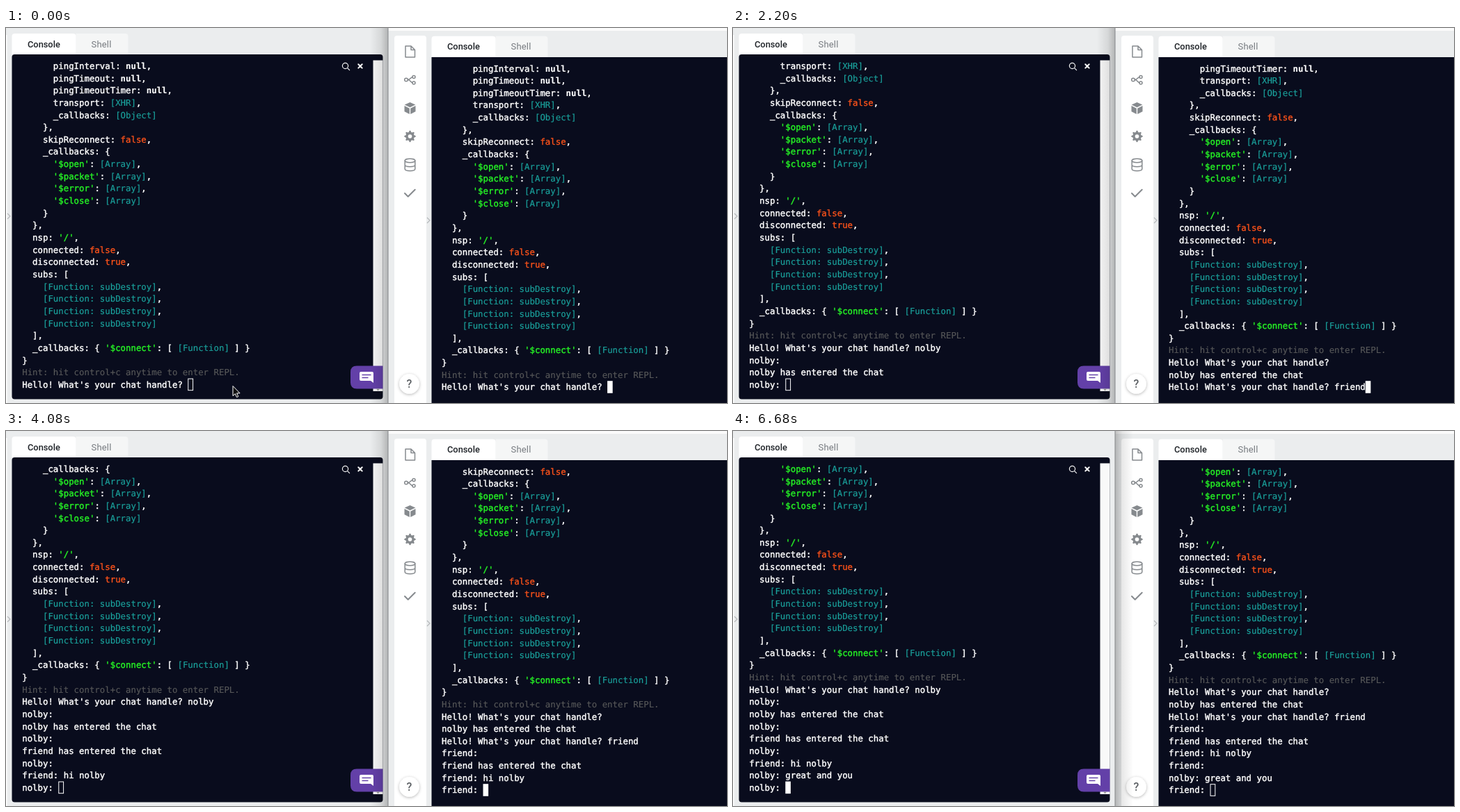
Write an HTML page that moves like this. It is 1036 by 540 pixels and loops after 6720 ms.

```html
<!DOCTYPE html>
<html lang="en">
<head>
<meta charset="utf-8">
<title>Two chat consoles</title>
<style>
html, body { margin: 0; width: 100%; height: 100%; overflow: hidden; background: #ebedee; }
svg { display: block; width: 100vw; height: 100vh; }
.term text { font: 12.36px "DejaVu Sans Mono", monospace; white-space: pre; color: #fff; fill: currentColor; stroke: currentColor; stroke-width: .42; text-rendering: geometricPrecision; }
.term tspan { fill: currentColor; stroke: currentColor; }
.term .cyan { color: #1a9f9a; stroke-width: .2; }
.term .green { color: #25f025; }
.term .red { color: #fb521a; stroke-width: .35; }
.term .bold { font-weight: bold; stroke-width: .1; }
.term .hint { color: #575859; stroke-width: .15; }
.tab { font: 500 12.8px Roboto, sans-serif; fill: #1d2126; }
.off { font-weight: 400; font-size: 13px; letter-spacing: .2px; fill: #777b80; }
.icon { fill: none; stroke: #868a8e; stroke-width: 1.5; stroke-linejoin: round; stroke-linecap: round; }
</style>
</head>
<body>
<svg viewBox="0 0 1036 540" preserveAspectRatio="none">
  <defs>
    <linearGradient id="toLeft" x1="1" x2="0">
      <stop stop-color="#000" stop-opacity=".24"/><stop offset=".4" stop-color="#000" stop-opacity=".09"/><stop offset="1" stop-color="#000" stop-opacity="0"/>
    </linearGradient>
    <linearGradient id="toRight">
      <stop stop-color="#000" stop-opacity=".24"/><stop offset=".4" stop-color="#000" stop-opacity=".09"/><stop offset="1" stop-color="#000" stop-opacity="0"/>
    </linearGradient>
    <filter id="soft" x="-50%" y="-50%" width="200%" height="200%"><feDropShadow dx="0" dy="1" stdDeviation="2" flood-opacity=".3"/></filter>
    <g id="tabs">
      <path d="M92 30V0h71q4 0 4 4v26z" fill="#f5f6f6"/>
      <path d="M0 30V4q0-4 4-4h84q4 0 4 4v26z" fill="#fff"/>
      <text class="tab" x="22.5" y="19.5">Console</text>
      <text class="tab off" x="114" y="19.5">Shell</text>
    </g>
    <path id="chevron" d="M-2-4 2 0-2 4" fill="none" stroke="#b4b7ba" stroke-width="1.1"/>
  </defs>

  <rect width="549" height="540" fill="#ebedee"/>
  <rect y="10" width="1.5" height="530" fill="#fff"/>
  <use href="#tabs" x="8.5" y="8"/>
  <use href="#chevron" x="4" y="271"/>
  <rect x="8.5" y="38" width="533" height="496.500" rx="4" fill="#090c1d"/>
  <rect x="527.5" y="46.500" width="14" height="476.500" fill="#f9f9f9"/>
  <g class="term" id="left"></g>
  <g fill="none" stroke="#f4f4f4" stroke-width="1.2" stroke-linecap="round">
    <circle cx="487.5" cy="54.5" r="4.1"/><path d="m490.6 57.6 3 3"/>
    <path d="m506.3 52.2 5.4 5.4m0-5.4-5.4 5.4" stroke-width="2"/>
  </g>
  <path d="M541.5 486.500H504q-9 0-9 9v15q0 9 9 9h37.500z" fill="#6340a8"/>
  <path d="M510 495h16q2 0 2 2v14l-4-3h-14q-2 0-2-2v-9q0-2 2-2z" fill="#fff"/>
  <path d="M511.500 499.500h13m-13 4h9" stroke="#6340a8" stroke-width="1.6"/>
  <path d="M532 519.500h5l-2.500 3z" fill="#999"/>
  <rect id="shadeLeft" x="523" width="26" height="540" fill="url(#toLeft)"/>

  <rect x="549" width="487" height="540" fill="#ebedee"/>
  <rect x="549" width="487" height="4" fill="#fbfbfb"/>
  <path d="M558 540V15q0-4 4-4h38q4 0 4 4v525z" fill="#fff"/>
  <use href="#tabs" x="611.500" y="11.800"/>
  <use href="#chevron" x="607" y="277"/>
  <path d="M611.500 540V42H1036V540z" fill="#090c1d"/>
  <g class="term" id="right"></g>

  <g class="icon">
    <path d="M574 26h8l5.500 5.500V42H574zM582 26v5.500h5.500"/>
    <path d="M577 74.500c5 0 4-4 8-4m-8 4c5 0 4 4.500 8 4.500"/>
    <g fill="#fff"><circle cx="575" cy="74.500" r="2.300"/><circle cx="586" cy="70.500" r="2"/><circle cx="586" cy="79" r="2"/></g>
    <g stroke="none" fill="#868a8e">
      <path d="m580.500 107 7.800 3.500-7.800 3.800-7.800-3.800zM572.500 112l7.300 3.700v8.300l-7.300-3.700zM588.500 112l-7.300 3.700v8.300l7.300-3.700z"/>
      <path id="gear" fill-rule="evenodd"/>
    </g>
    <ellipse cx="580.500" cy="191" rx="7.300" ry="2.700"/>
    <path d="M573.200 191v12c0 3.600 14.600 3.600 14.600 0v-12M573.200 197c0 3.600 14.600 3.600 14.600 0"/>
    <path d="m573 238 4.700 4.700 10-10" stroke-width="2"/>
  </g>
  <circle cx="579.500" cy="512.500" r="14.300" fill="#fff" filter="url(#soft)"/>
  <text x="579.500" y="518" text-anchor="middle" style="font:500 16px Roboto,sans-serif" fill="#5c6064">?</text>
  <rect id="shadeRight" x="549" width="26" height="540" fill="url(#toRight)"/>
  <path d="M549 0v540" stroke="#85878a" stroke-width="1"/>
  <path id="pointer" d="M326 515.500v14.200l3.300-3 2.200 5 2.300-1-2.200-4.800h4.500z" fill="#111" stroke="#fff" stroke-width="1"/>
</svg>
<script>
const LOOP = 6720, ROWS = 27, CHAR = 7.44, LINE = 17.65;
const $ = id => document.getElementById(id);

const DUMP = `      pingInterval: null,
      pingTimeout: null,
      pingTimeoutTimer: null,
      transport: [XHR],
      _callbacks: [Object]
    },
    skipReconnect: false,
    _callbacks: {
      '$open': [Array],
      '$packet': [Array],
      '$error': [Array],
      '$close': [Array]
    }
  },
  nsp: '/',
  connected: false,
  disconnected: true,
  subs: [
    [Function: subDestroy],
    [Function: subDestroy],
    [Function: subDestroy],
    [Function: subDestroy]
  ],
  _callbacks: { '$connect': [ [Function] ] }
}
Hint: hit control+c anytime to enter REPL.`.split("\n");

const ASK = "Hello! What's your chat handle? ";
const A = "nolby", B = "friend";
const joined = name => `${name} has entered the chat`;
const HI = `hi ${A}`, REPLY = "great and you";

// Each step edits the list of lines for time t.
const print = (at, ...rows) => (lines, t) => { if (t >= at) lines.push(...rows); };
const type = (from, to, text) => (lines, t) => {
  if (t < from) return;
  const n = 1 + Math.floor((t - from) / (to - from) * (text.length - 1));
  lines[lines.length - 1] += text.slice(0, n);
};
const erase = at => (lines, t) => {
  if (t >= at) lines.push(lines.pop().slice(0, -1));
};

const scripts = {
  left: [
    print(0, ASK), type(280, 680, A),
    print(760, A + ": "), print(880, joined(A), A + ": "),
    print(2480, joined(B), A + ": "),
    print(3840, `${B}: ${HI}`, A + ": "),
    type(4320, 4640, "gret"), erase(4880), type(5040, 6000, REPLY.slice(3)),
    print(6360, A + ": ")
  ],
  right: [
    print(0, ASK), print(880, joined(A), ASK), type(1600, 2120, B),
    print(2360, B + ": "), print(2480, joined(B), B + ": "),
    type(2800, 3520, HI), print(3760, B + ": "),
    print(6480, `${A}: ${REPLY}`, B + ": ")
  ]
};

const leftActive = t => (t >= 200 && t < 1400) || t >= 4160;

const paint = s => s.startsWith("Hint") ? `<tspan class="hint">${s}</tspan>` :
  s.replace(/'[^' ]+'|\[[A-Z][^\]]*\]|true|false|null/g, w => {
    const kind = w[0] === "'" ? "green" : w[0] === "[" ? "cyan" : w === "null" ? "bold" : "red";
    return `<tspan class="${kind}">${w}</tspan>`;
  });

const shown = {};
function drawPane(id, x, y, active, t) {
  const lines = [...DUMP];
  scripts[id].forEach(step => step(lines, t));
  const rows = lines.slice(-ROWS);
  const cx = x + rows[ROWS - 1].length * CHAR, cy = y + (ROWS - 1) * LINE;
  const cursor = active
    ? `<rect x="${cx}" y="${cy}" width="7.6" height="17.6" fill="#fff"/>`
    : `<rect x="${cx + 0.5}" y="${cy + 0.5}" width="6.8" height="16.6" fill="none" stroke="#fff"/>`;
  const html = rows.map((s, i) =>
    `<text x="${x}" y="${(y + i * LINE + 13.2).toFixed(2)}">${paint(s)}</text>`).join("") + cursor;
  if (shown[id] !== html) $(id).innerHTML = shown[id] = html;
}

function draw(t) {
  const left = leftActive(t);
  drawPane("left", 23.2, 45.7, left, t);
  drawPane("right", 626, 49.3, !left, t);
  $("shadeLeft").style.opacity = left ? 0 : 1;
  $("shadeRight").style.opacity = left ? 1 : 0;
  $("pointer").style.opacity = t < 280 ? 1 : 0;
}

function gearPath(cx, cy) {
  const pts = Array.from({ length: 32 }, (_, i) => {
    const r = i % 4 < 2 ? 8.2 : 6.2, a = (i - 0.5) * Math.PI / 16;
    return `${(cx + r * Math.cos(a)).toFixed(2)} ${(cy + r * Math.sin(a)).toFixed(2)}`;
  });
  return `M${pts.join("L")}zM${cx - 2.8} ${cy}a2.8 2.8 0 1 0 5.6 0a2.8 2.8 0 1 0-5.6 0z`;
}
$("gear").setAttribute("d", gearPath(580.5, 156));

const start = performance.now();
function tick() {
  draw((performance.now() - start) % LOOP);
  requestAnimationFrame(tick);
}
tick();
</script>
</body>
</html>
```
